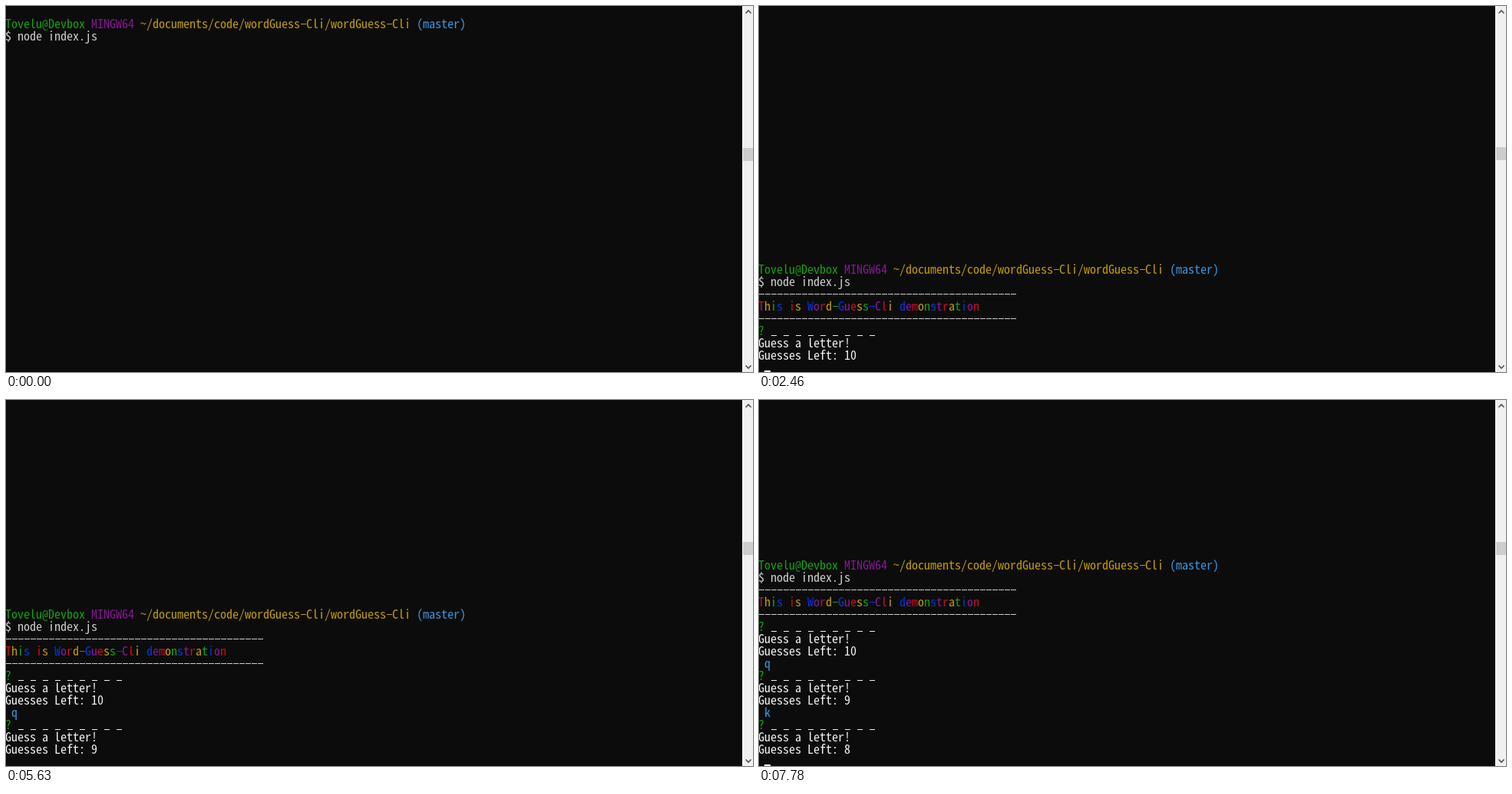
An HTML page with a canvas that plays this animation: 973 by 477 pixels, repeating every 8000 ms.

```html
<!DOCTYPE html>
<html lang="en">
<meta charset="utf-8">
<title>Terminal word game</title>
<style>
  html, body { margin: 0; width: 100%; height: 100%; overflow: hidden; background: #0c0c0c; }
  canvas { display: block; }
</style>
<canvas width="973" height="477"></canvas>
<script>
const LOOP = 8000, CELL = 8, ROW = 16, ORIGIN = -1;
const GRAY = '#cccccc', WHITE = '#f2f2f2', RED = '#c50f1f', GREEN = '#13a10e',
      YELLOW = '#c19c00', BLUE = '#0037da', MAGENTA = '#881798', CYAN = '#3a96dd';
const RAINBOW = [RED, YELLOW, GREEN, BLUE, MAGENTA];
// Line characters are crisp one-pixel strokes at these heights within a row.
const STROKES = { '-': 8, '_': 14 };

const ctx = document.querySelector('canvas').getContext('2d');

// Size the font so that one character fills one cell.
const family = '"Noto Sans Mono CJK KR", "Noto Sans Mono CJK JP", "Noto Sans Mono", monospace';
ctx.font = `100px ${family}`;
ctx.font = `${100 * CELL / ctx.measureText('0').width}px ${family}`;

// top: row of the prompt; answers: letters already guessed; open: a question is waiting
const scenes = [
  { at: 0, top: 1 },
  { at: 450, top: 1, title: true },
  { at: 570, top: 21, title: true, answers: '', open: true, thumb: 184 },
  { at: 3730, top: 21, title: true, answers: '', open: true, typed: 'q', thumb: 184 },
  { at: 4100, top: 17, title: true, answers: 'q', open: true },
  { at: 6590, top: 17, title: true, answers: 'q', open: true, typed: 'k' },
  { at: 6730, top: 17, title: true, answers: 'q' },
  { at: 6850, top: 13, title: true, answers: 'qk', open: true }
];
const cursorOff = [[0, 300], [880, 1470], [2030, 2460], [3020, 3580],
                   [4630, 5060], [5630, 6160], [7250, 7780]];

function rect(color, x, y, w, h) {
  ctx.fillStyle = color;
  ctx.fillRect(x, y, w, h);
}

function print(row, ...parts) {
  const y = ORIGIN + ROW * row;
  let x = ORIGIN;
  for (const [text, color] of parts) {
    ctx.fillStyle = color;
    for (const ch of text) {
      if (ch in STROKES) ctx.fillRect(x + 1, y + STROKES[ch], CELL - 1, 1);
      else ctx.fillText(ch, x, y + 14);
      x += CELL;
    }
  }
}

function chevron(y, dir) {
  ctx.strokeStyle = '#505050';
  ctx.lineWidth = 1.6;
  ctx.beginPath();
  ctx.moveTo(963.5, y + 2 * dir);
  ctx.lineTo(967, y - 1.5 * dir);
  ctx.lineTo(970.5, y + 2 * dir);
  ctx.stroke();
}

function drawScrollbar(thumb = 185) {
  rect('#ffffff', 959, 0, 1, 477);
  rect('#f0f0f0', 960, 0, 13, 477);
  rect('#cdcdcd', 960, thumb, 13, 17);
  chevron(7.5, 1);
  chevron(470.5, -1);
}

function drawQuestion(row, left) {
  print(row, ['?', GREEN], [' _'.repeat(9), WHITE]);
  print(row + 1, ['Guess a letter!', WHITE]);
  print(row + 2, ['Guesses Left: ' + left, WHITE]);
}

function draw(t) {
  const { top, title, answers = '', open, typed = '', thumb } = scenes.findLast(s => s.at <= t);
  rect('#0c0c0c', 0, 0, 973, 477);

  let row = top;
  print(row++, ['Tovelu@Devbox', GREEN], [' MINGW64', MAGENTA],
    [' ~/documents/code/wordGuess-Cli/wordGuess-Cli', YELLOW], [' (master)', CYAN]);
  print(row++, ['$ node index.js', GRAY]);

  if (title) {
    const rule = ['-'.repeat(42), GRAY];
    const letters = [...'This is Word-Guess-Cli demonstration'];
    print(row++, rule);
    print(row++, ...letters.map((ch, i) => [ch, RAINBOW[i % 5]]));
    print(row++, rule);
  }

  [...answers].forEach((letter, i) => {
    drawQuestion(row, 10 - i);
    print(row + 3, [' ' + letter, CYAN]);
    row += 4;
  });

  let col = 0;
  if (open) {
    drawQuestion(row, 10 - answers.length);
    row += 3;
    print(row, [' ' + typed, GRAY]);
    col = 1 + typed.length;
  }

  if (!cursorOff.some(([from, to]) => t >= from && t < to))
    rect('#ffffff', ORIGIN + CELL * col, ORIGIN + ROW * row + 12, CELL, 4);

  drawScrollbar(thumb);
}

function tick() {
  draw(performance.now() % LOOP);
  requestAnimationFrame(tick);
}
tick();
</script>
</html>
```
